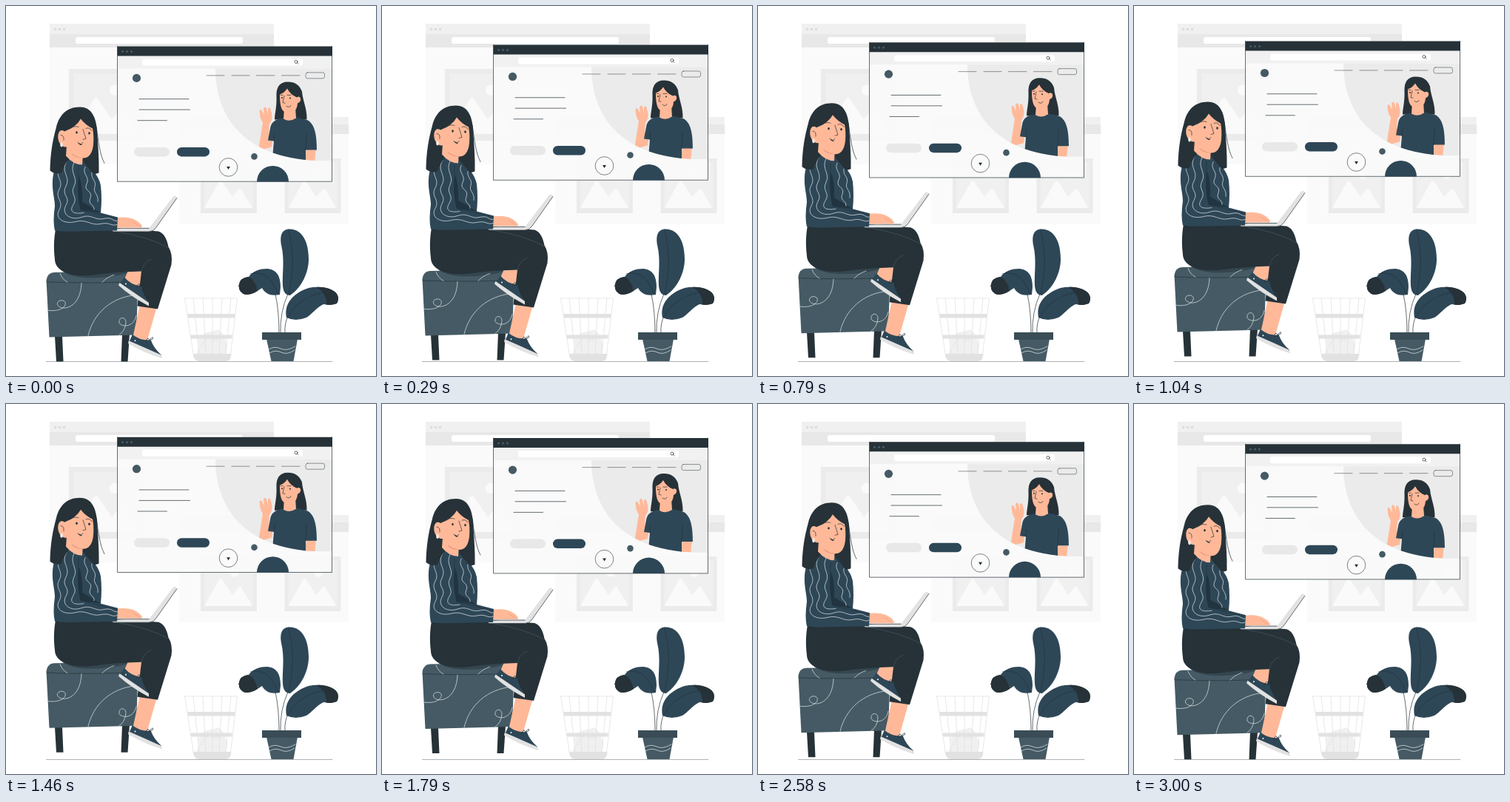
An HTML page for the animation above (3040 ms loop, 500x500 px).

```html
<!DOCTYPE html>
<html lang="en">
<head>
<meta charset="utf-8">
<title>Floating browser scene</title>
<style>
html, body { margin: 0; width: 100%; height: 100%; overflow: hidden; background: #fff }
svg { display: block; width: 100vw; height: 100vh }
.ink { fill: #263238 }
.blue { fill: #2e4757 }
.slate { fill: #455a64 }
.skin { fill: #ffb999 }
.line { fill: none; stroke: #263238; stroke-width: .7; stroke-linecap: round; stroke-linejoin: round }
.pale { stroke: #e6eaec }
.vein { stroke: #1f303b; stroke-width: .6 }
.g1 { fill: #fafafa } .g3 { fill: #ebebeb } .g4 { fill: #e2e2e2 }
</style>
</head>
<body>
<svg viewBox="0 0 500 500">
<defs>
  <path id="curve" d="M283 84C283 152 325 212 440.500 208.500V84Z"/>
  <clipPath id="hero"><use href="#curve"/></clipPath>
  <g id="photo">
    <path class="g3" d="M0 0H76V74H0Z"/>
    <path fill="#f0f0f0" d="M5 5H71V67H5Z"/>
    <circle class="g1" cx="46" cy="22" r="5.5"/>
    <path class="g1" d="M5 67L25 31Q27 29 29 31L43 52L51 42Q53 40 55 42L70 67Z"/>
  </g>
</defs>

<!-- back windows -->
<path class="g1" d="M59 24H362V214H59Z"/>
<path fill="#f0f0f0" d="M59 24H362V38H59Z"/>
<path fill="#e8e8e8" d="M59 38H362V56H59Z"/>
<g fill="#dcdcdc"><circle cx="66.500" cy="31.500" r="1.800"/><circle cx="72.500" cy="31.500" r="1.800"/><circle cx="78.500" cy="31.500" r="1.800"/></g>
<rect x="94" y="42" width="226" height="9" rx="3" fill="#fff"/>
<use href="#photo" transform="translate(85 85) scale(1.350 1.310)"/>
<path class="g1" d="M234 150H463V295H234Z"/>
<path fill="#f0f0f0" d="M234 150H463V160H234Z"/>
<path fill="#e8e8e8" d="M234 160H463V173H234Z"/>
<use href="#photo" x="263" y="206"/>
<use href="#photo" x="376.500" y="206"/>

<!-- ground, bin, plant -->
<path class="line" style="stroke:#8b9295" d="M54.500 480.500H441"/>
<path fill="#f0f0f0" d="M257 470L261 460L259 452L268 442L278 440L287 437L294 444L299 458L297 470Z"/>
<path class="line" style="stroke:#dedede" d="M241.500 395H312.500L303 475M241.500 395L254 475M253 395L261 471M266 395L270 471M279 395L279 471M292 395L288 471M304 395L297 471M262 462L272 447L284 452L293 446"/>
<path class="g4" d="M245 416H310L309 421.500H246ZM249 444.500H306L305 449.500H250ZM253 470H304.500Q304 480 297 480H261Q254 480 253 470Z"/>
<path class="line" d="M369 441Q369 412 364 389M371 441Q370 414 381 389M377 441Q376 430 381 419"/>
<path class="blue" d="M384 301.500C372 301 370 311 372 323C377 344 373 362 374 378Q375 391 384 391C400 380 409 360 409 342C409 318 400 302 384 301.500Z"/>
<path class="line vein" d="M382 303Q393 345 382 389"/>
<path class="blue" d="M370 390C359 392 351 390 346 381C339 386 332 390 324 390Q315 388 314.500 378Q316 367 328 366C333 358 344 355 353 355C366 356 371 365 371 380Z"/>
<path class="ink" d="M340 385C334 389 329 390 324 390Q315 388 314.500 378Q316 367 327 366Q337 370 340 385Z"/>
<path class="line vein" d="M330 362Q355 355 368 389"/>
<path class="blue" d="M379 421C375 400 391 387 409 381C424 378 441 381 447 389Q451 395 447 402Q439 405 429 403C419 408 413 417 406 421Q391 427 379 421Z"/>
<path class="ink" d="M420 380C430 379 443 383 447 389Q451 395 447 402Q439 405 433 403.500Q434 389 420 380Z"/>
<path class="line vein" d="M381 420Q393 395 428 387"/>
<path class="slate" d="M352 450H394L388.500 480H358.500Z"/>
<path fill="#3a4d57" d="M346 441H399V451H346Z"/>
<path class="line pale" d="M355 464Q363 459 371 463T391 460M356 469Q364 464 372 468T390 465"/>

<g id="float">
<!-- front window -->
<path class="g1" fill-opacity=".95" d="M150.500 54H440.500V237H150.500Z"/>
<path fill="#f1f1f1" d="M151 67H440V84H151Z"/>
<use class="g3" href="#curve"/>
<rect x="184" y="71" width="217" height="9" rx="3" fill="#fff"/>
<circle class="line" cx="392" cy="75" r="2"/><path class="line" d="M393.500 76.500L395 78"/>
<path class="line" d="M150.500 54V236.800H440.500V54"/>
<path class="ink" d="M150.500 54H441V67H150.500Z"/>
<g class="slate"><circle cx="157.500" cy="61" r="1.600"/><circle cx="163.500" cy="61" r="1.600"/><circle cx="169.500" cy="61" r="1.600"/>
<circle cx="176.500" cy="97" r="5.600"/></g>
<path class="line" style="stroke-width:.5" d="M271 93.500H295M305 93.500H329M338.500 93.500H363M372.500 93.500H397"/>
<rect class="line" style="stroke-width:.5" x="405" y="89.500" width="25.500" height="8" rx="2.500"/>
<path class="line" d="M180 125.300H247M180 139.700H248.500M178 154.300H217.500"/>
<rect x="173" y="190.500" width="48" height="12.500" rx="6.200" fill="#e8e8e8"/>
<rect class="blue" x="231" y="190.500" width="44" height="12.500" rx="6.200"/>
<circle cx="300.500" cy="217.500" r="12.300" fill="#fafafa" stroke="#263238" stroke-width=".6"/>
<path class="ink" d="M298 216.500H303L300.500 220.500Z"/>
<circle class="slate" cx="335.500" cy="203" r="4.300"/>
<path class="blue" d="M339 237A21.500 21.500 0 0 1 382 237Z"/>
<g clip-path="url(#hero)">
  <path class="ink" d="M381 102C369 102 365 110 365.500 122C366 137 363 145 363 153L406.500 153C407 138 401 128 400 115Q395 102 381 102Z"/>
  <path class="skin" d="M362 168L359 190L341 195L347 157C343 152 343 146 342.500 141Q344 138 346 141L349 147L348 138Q350 134 352 138L354 146L354 138Q357 135 358 141Q362 152 356 159L355 172Z"/>
  <path class="skin" d="M406 190H419L417 212H404Z"/>
  <path class="blue" d="M374 151C364 152 358 157 357 165L354 181L362 182L360 206L405 214V194H420C420 176 418 160 408 154Q399 151 391 150Z"/>
  <path class="skin" d="M376 137L375 152Q383 157 392 151L391 136Z"/>
  <path class="skin" d="M370 119Q376 117 380 111Q384 119 393 123Q396 121 398 124Q399 129 394 131Q393 144 382 144C373 144 370 137 370 119Z"/>
  <path class="line" d="M376 121L374 130L377 131M379 135Q383 138 385 134M371 120L374 120M380 120L385 120M405 194L406 172M362 182L363 172"/>
  <g class="ink"><circle cx="373" cy="123.500" r="1"/><circle cx="384" cy="124" r="1"/></g>
</g>

<!-- stool -->
<path class="ink" d="M66 446H76L77.500 480H68ZM157 443H167L164.500 480H155.500Z"/>
<path class="slate" d="M54.500 370Q56 360 65 359.500L168 358Q178 361 178.500 372L176 444L58.500 447Z"/>
<path fill="#34464f" d="M76 358Q88 366 110 367Q148 367 170 358Z"/>
<path class="line" d="M55 372.500Q110 375 178 372"/>
<path class="line pale" d="M57.500 411C73 413 82 406 80 400C77 395 67 398 70 404C75 412 101 409 102 374M111 445C118 415 142 393 176 390M176 418C173 434 157 434 153 428C152 419 162 419 162 427Q161 439 153 444M73 361Q76 369 83 373M130 373Q136 366 146 363"/>

<!-- legs -->
<path class="skin" d="M168 350H189L181 381L159 371ZM182 398L205 402L191 451Q181 453 172 444Z"/>
<path class="ink" d="M67 301L150 300L206 304Q216 307 219.500 325Q225.500 334 223.500 349L205 409L177.500 405L183 358Q145 359 118 363C87 367 66 357 66 342C64 325 65 313 67 301Z"/>
<path class="line" style="stroke:#465761" d="M148 304Q194 312 219 326M183 358Q185 346 196 342"/>
<g id="shoe">
  <path class="blue" d="M160 366L152.500 377L193 404.500V400Q185 390 183 378Q169 377 160 366Z"/>
  <path class="g4" d="M153.500 373.500Q172 386 193 400.500V405Q170 393 152 377Z"/>
  <path class="line" d="M176 380Q180 371 181 378Q188 372 186 377L179 379"/>
  <circle fill="#fff" cx="162" cy="375" r="1"/>
</g>
<use href="#shoe" transform="translate(165.500 455.500) rotate(-10.500) translate(-152.500 -377)"/>

<!-- laptop and hand -->
<path class="g4" d="M141 301L194 299L225.500 257.500Q229 254.500 231 259L202 300Q199 304 193 304.500H145Z"/>
<path class="line" d="M141 304.500H193Q199 304 202 300L231 259M148 300H193"/>
<path class="skin" d="M148 286Q162 284 171 287Q181 291 184 297Q184 300 179 299H148Z"/>
<path class="line" style="stroke:#e99a7c" d="M171 291L180 297"/>

<!-- torso -->
<path class="blue" d="M84 202C69 208 65 217 63 235C62 249 66 260 66 270Q63 291 66 303Q82 305 96 304L150 303L151 285L128 279Q130 260 128 242Q126 232 119 224Q112 211 103 208Z"/>
<path fill="#21343f" d="M99 229Q104 246 103 264L128 279L101 275Q95 252 99 229Z"/>
<path class="line pale" d="M73 215C64 230 79 235 72 247S79 263 72 275S79 295 94 291S115 297 128 294S142 298 150 295M82 210C73 224 88 230 81 243S88 257 81 269S88 290 102 285S120 290 132 287S144 291 150 290M92 211C85 225 98 231 92 243S98 257 91 268S94 281 105 279M107 217C102 227 114 230 109 240S118 249 114 259S120 267 119 275M116 225C114 233 123 236 120 244S126 254 124 264"/>
<path class="line vein" d="M98 217Q96 256 101 275L150 287"/>

<!-- head -->
<path class="ink" d="M100 136C82 136 72 147 68 163C63 181 60 198 59.500 222Q67 228 75 225Q79 212 88 203L104 209L119 227L125.500 225C126 205 124 185 123 166C121 147 114 136 100 136Z"/>
<path class="line" d="M122 163C125 184 127 201 133 212"/>
<path class="skin" d="M82 188L81 202Q91 214 103 214L104 198Z"/>
<path fill="#e99a7c" d="M88 199Q95 206 104 205V200Z"/>
<path class="skin" d="M79 169Q95 163 101 152Q107 160 117 165Q119 174 118 187Q116 205 104 205Q90 203 82 190C75 191 69 183 70.500 173Q73 165 79 169Z"/>
<path class="line" d="M104 166L108 179L104 180M87 165Q92 161 98 163M108 165Q113 163 116 168M97 184Q101 189 104 184M74 174Q79 174 78 181"/>
<path class="ink" d="M97 184L103 187Q100 189 97 184Z"/>
<g class="ink"><ellipse cx="95.500" cy="170.500" rx="1.300" ry="1.700"/><ellipse cx="112.500" cy="171.500" rx="1.300" ry="1.700"/></g>
<ellipse cx="75" cy="187" rx="1.700" ry="3" fill="#f0f0f0"/>
</g>
</svg>
<script>
const LOOP = 3040, BASE = .4, LIFT = 10.1;
const scene = document.getElementById('float');
const start = performance.now();

function draw(now) {
  const p = (Math.max(0, now - start) % LOOP) / LOOP;
  const rise = 1 - Math.abs(1 - 2 * p);
  scene.setAttribute('transform', `translate(0 ${BASE - LIFT * rise})`);
  requestAnimationFrame(draw);
}
draw(start);
</script>
</body>
</html>
```
